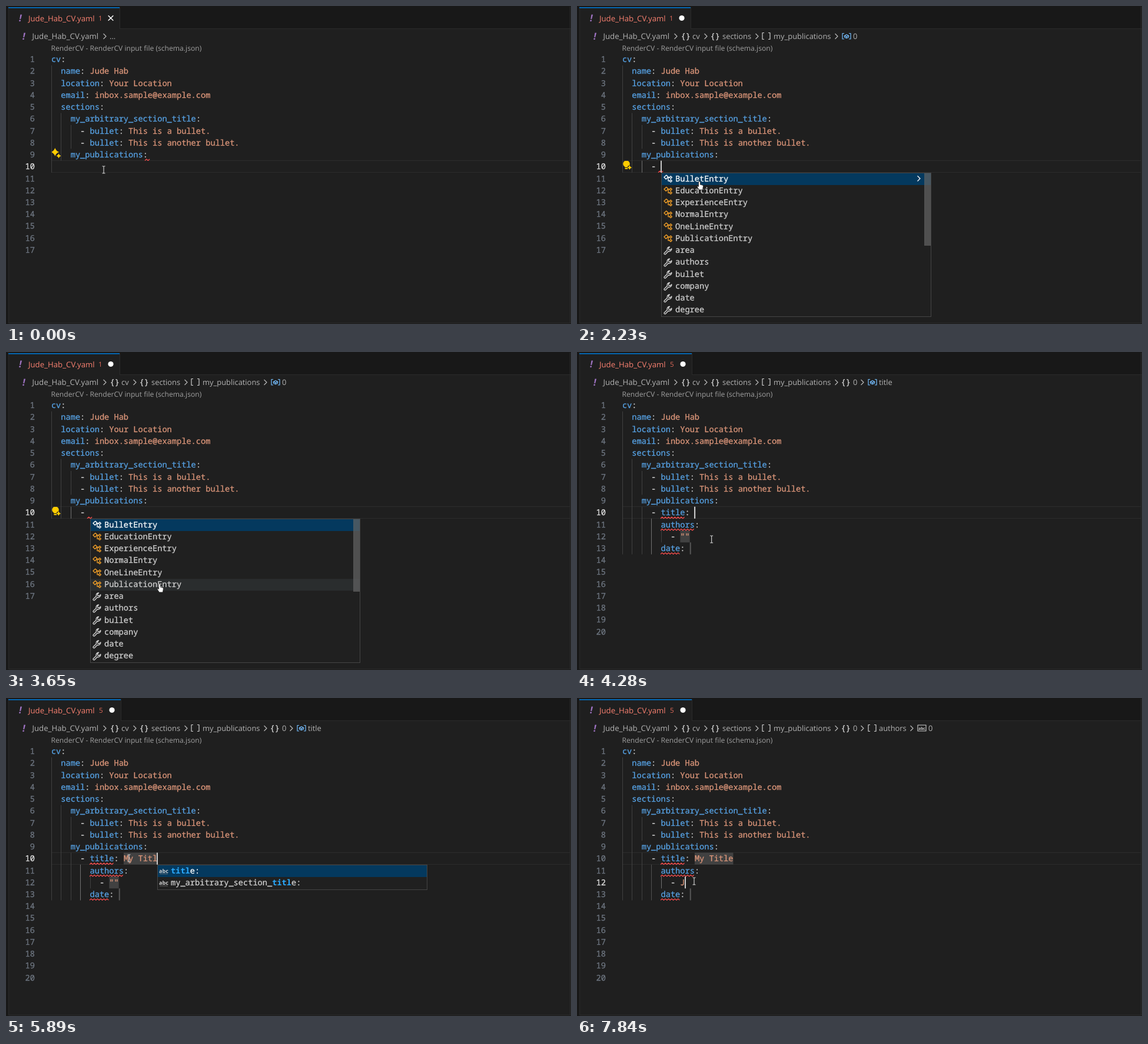
These frames come from a looping animation (960x540 px, 8000 ms). An HTML page with a canvas:

```html
<!DOCTYPE html>
<html lang="en">
<head>
<meta charset="utf-8">
<title>Editing a CV in YAML</title>
<style>
html, body { margin: 0; height: 100%; overflow: hidden; background: #1f1f1f; }
canvas { display: block; width: 100vw; height: 100vh; }
</style>
</head>
<body>
<canvas id="stage" width="960" height="540"></canvas>
<script>
const ctx = document.getElementById('stage').getContext('2d');
const LOOP = 8000, CHAR = 8.2, LINE = 20.23;
const MONO = '13.67px "Noto Sans Mono", monospace';
const sans = size => `${size}px "Open Sans", sans-serif`;
const KEY = '#57a3e6', STRING = '#dc967a', PLAIN = '#d0d0d0', RED = '#f14c4c';
const CRUMB = '#b2b2b2', YELLOW = '#ffcc00', BLUE = '#75beff';
const PERSON = 'Jude Hab', FILE = PERSON.replace(' ', '_') + '_CV.yaml';

// Moments of the story, in ms
const DASH = 730, SPACE = 1120, SUGGEST = 1400, CRUMBS = 1480, BULB = 1560;
const INSERT = 3950, ERRORS = 4200, CLICK = 6860, ERASE = 7270, EMPTY = 7380, LETTER = 7560;
const TITLE = 'My Title', TITLE_KEYS = [5100, 5320, 5440, 5560, 5670, 5780, 5870, 5990];
const CURSOR_RESETS = [70, DASH, SPACE, INSERT, ...TITLE_KEYS, CLICK, ERASE, EMPTY, LETTER];
const MOUSE = [[2050, 166, 278], [2230, 208, 298], [2850, 246, 369], [3210, 261, 394],
  [3920, 261, 394], [4500, 209, 272], [6300, 209, 272], [6860, 199, 311]];
const ENTRIES = ['Bullet', 'Education', 'Experience', 'Normal', 'OneLine', 'Publication'].map(s => s + 'Entry');
const FIELDS = ['area', 'authors', 'bullet', 'company', 'date', 'degree'];

const CLASS_ICON = 'M1 4.5 4.8 1 8 4 4.2 7.8Z M6.5 5H10 M8 5V10.8H10 M10 4.8 12.2 2.8 14.3 4.8 12.2 6.8Z M10 10.8 12.2 8.8 14.3 10.8 12.2 12.8Z';
const WRENCH_ICON = 'M10.5 1.2A4.2 4.2 0 0 0 6.4 6.8L1.3 11.6a1.5 1.5 0 0 0 2.1 2.1L8.3 8.7A4.2 4.2 0 0 0 13.8 4.2L11.3 6.4 8.9 5.9 8.4 3.6Z';
const HAND = 'M-1.4 .6Q0-1.4 1.4 .6V5.2L5 6Q6.6 6.5 6.4 8L5.4 14H-.6L-4 8.8Q-3.4 7-1.4 8.6Z';
const IBEAM = 'M-2.5-6H-1Q0-6 0-5 0-6 1-6H2.5 M0-5V5 M-2.5 6H-1Q0 6 0 5 0 6 1 6H2.5';

const colX = col => 76.9 + CHAR * col;
const baseline = row => 95.2 + LINE * (row - 1);
const rowTop = row => 80.6 + LINE * (row - 1);

function rect(x, y, w, h, color) {
  ctx.fillStyle = color;
  ctx.fillRect(x, y, w, h);
}

function text(str, x, y, color, font = MONO, align = 'left') {
  ctx.font = font;
  ctx.textAlign = align;
  ctx.fillStyle = ctx.strokeStyle = color;
  ctx.fillText(str, x, y);
  // A hairline outline gives code its slightly heavier weight
  if (font === MONO) {
    ctx.lineWidth = .3;
    ctx.strokeText(str, x, y);
  }
}

function shape(x, y, d, { stroke, fill, width = 1.1 }) {
  const path = new Path2D(d);
  ctx.save();
  ctx.translate(x, y);
  ctx.lineWidth = width;
  if (fill) { ctx.fillStyle = fill; ctx.fill(path); }
  if (stroke) { ctx.strokeStyle = stroke; ctx.stroke(path); }
  ctx.restore();
}

const dot = (x, y, r, fill) => shape(x, y, `M${-r} 0a${r} ${r} 0 1 0 ${2 * r} 0a${r} ${r} 0 1 0 ${-2 * r} 0`, { fill });
const chevron = (x, y, stroke) => shape(x, y, 'M-2.5-4.5 2 0-2.5 4.5', { stroke, width: 1.3 });
const star = (x, y, r) => shape(x, y, `M0 ${-r}Q${r * .25} ${-r * .25} ${r} 0 ${r * .25} ${r * .25} 0 ${r} ${-r * .25} ${r * .25} ${-r} 0 ${-r * .25} ${-r * .25} 0 ${-r}Z`, { fill: YELLOW });

function squiggle(x, row, width) {
  let d = 'M0 1.2';
  for (let i = 1; i * 2.7 <= width + 1; i++) d += `L${i * 2.7} ${i % 2 ? -1.2 : 1.2}`;
  shape(x, rowTop(row) + 18.8, d, { stroke: RED, width: 1.3 });
}

function code(row, col, marker, key, value = '') {
  text(marker, colX(col), baseline(row), PLAIN);
  col += marker.length;
  if (key) {
    text(key, colX(col), baseline(row), KEY);
    text(':', colX(col + key.length), baseline(row), PLAIN);
    col += key.length + 2;
  }
  text(value, colX(col), baseline(row), STRING);
}

function guide(col, first, last, color = '#404040') {
  rect(Math.round(colX(col)), rowTop(first), 1, LINE * (last - first + 1), color);
}

function drawFrame(errors, modified) {
  rect(0, 0, 960, 38, '#181818');
  rect(0, 38, 960, 502, '#1f1f1f');
  rect(0, 0, 4, 540, '#181818');
  rect(4, 38, 956, 1, '#2b2b2b');
  rect(4, 1, 1, 538, '#2b2b2b');
  rect(958, 1, 1, 538, '#2b2b2b');
  rect(0, 538, 960, 2, '#181818');
  rect(4, 538, 956, 1, '#2b2b2b');
  const shift = errors > 1 ? 2 : 0;
  rect(5, 2, 188 + shift, 37, '#1f1f1f');
  rect(4, 2, 189 + shift, 1.6, '#0078d4');
  rect(193 + shift, 2, 1, 36, '#2b2b2b');
  text('!', 22, 26, '#a074c4', 'italic bold 16px "Open Sans", sans-serif');
  text(FILE, 38, 25.5, '#f88070', sans(13.2));
  text(errors, 157 + shift / 2, 25.3, '#e06a5a', sans(11.6));
  if (modified) dot(178 + shift, 20.5, 4.6, '#ffffff');
  else shape(178, 20.5, 'M-4.3-4.3 4.3 4.3M4.3-4.3-4.3 4.3', { stroke: '#ffffff', width: 1.5 });
}

const crumbIcons = {
  object: x => text('{}', x - 1.5, 55.8, PLAIN),
  array: x => shape(x, 51.5, 'M4-6H1V5H4M11-6H14V5H11', { stroke: PLAIN, width: 1.2 }),
  value: x => shape(x, 51.5, 'M4-5H1V4.5H4M12-5H15V4.5H12M4.5-1 8-3 11.5-1.2V1.5L8 3.2 4.5 1.5ZM4.5-1 8 .6 11.5-1.2M8 .6V3.2', { stroke: BLUE, width: 1.2 }),
  string: x => {
    shape(x, 51.5, 'M1-5.5H15V4.5H1Z', { stroke: PLAIN });
    text('abc', x + 8, 53.6, PLAIN, 'bold ' + sans(6.5), 'center');
  }
};

function crumb(chevronX, icon, iconX, label, labelX) {
  chevron(chevronX, 51.5, CRUMB);
  crumbIcons[icon](iconX);
  text(label, labelX, 56.4, CRUMB, sans(12.9));
}

function drawBreadcrumbs(t) {
  text('!', 28, 57, '#a074c4', 'italic bold 16px "Open Sans", sans-serif');
  text(FILE, 44.5, 56.4, CRUMB, sans(13.2));
  if (t < CRUMBS) {
    chevron(168, 51.5, CRUMB);
    text('...', 176, 56.4, CRUMB, sans(12.9));
    return;
  }
  crumb(168, 'object', 178, 'cv', 196);
  crumb(219, 'object', 228, 'sections', 247);
  crumb(306, 'array', 314, 'my_publications', 334);
  if (t < INSERT) return crumb(441, 'value', 450, '0', 469);
  crumb(441, 'object', 450, '0', 469);
  if (t < CLICK) return crumb(485, 'value', 494, 'title', 513);
  crumb(485, 'array', 494, 'authors', 513);
  crumb(569, 'string', 578, '0', 597);
}

function drawGutter(t, activeRow) {
  const count = t < INSERT ? 17 : 20;
  for (let row = 1; row <= count; row++)
    text(row, 49, baseline(row), row === activeRow ? '#e0e0e0' : '#6e7681', MONO, 'right');
  if (t < 850) {
    star(83.3, 248, 7);
    star(89.5, 254.5, 4);
  } else if (t >= BULB && t < INSERT) {
    dot(84, 268, 5.8, YELLOW);
    rect(81.5, 272, 5, 5, YELLOW);
    rect(81.5, 274, 5, 1, '#1f1f1f');
    dot(89.3, 274.3, 3.6, '#1f1f1f');
    star(89.3, 274.3, 3.8);
  }
}

function drawCode(t, typed, author) {
  rect(77, 262, 882, 1, '#2c2c2c');
  rect(77, 282, 882, 1, '#2c2c2c');
  const lastRow = t < INSERT ? 10 : 13;
  guide(0, 2, lastRow);
  guide(2, 6, t < DASH ? 9 : lastRow);
  guide(4, 7, 8);
  if (t >= DASH) guide(4, 10, lastRow, t < INSERT ? '#707070' : '#404040');

  text('RenderCV - RenderCV input file (schema.json)', 76.5, 76.4, '#9f9f9f', sans(12.14));
  code(1, 0, '', 'cv');
  code(2, 2, '', 'name', PERSON);
  code(3, 2, '', 'location', 'Your Location');
  code(4, 2, '', 'email', 'inbox.sample@example.com');
  code(5, 2, '', 'sections');
  code(6, 4, '', 'my_arbitrary_section_title');
  code(7, 6, '- ', 'bullet', 'This is a bullet.');
  code(8, 6, '- ', 'bullet', 'This is another bullet.');
  code(9, 4, '', 'my_publications');
  if (t < SPACE) squiggle(236, 9, 8);
  if (t < INSERT) {
    if (t >= DASH) code(10, 6, '-');
    if (t >= CRUMBS) squiggle(138, 10, 8);
    return;
  }

  const clicked = t >= CLICK;
  guide(6, 11, 13, clicked ? '#505050' : '#707070');
  guide(8, 12, 12, clicked ? '#707070' : '#404040');
  const placeholder = '#414141';
  rect(colX(15), rowTop(10), Math.max(2, typed.length * CHAR), LINE, placeholder);
  if (t < ERASE) rect(colX(12), rowTop(12), 2 * CHAR, LINE, placeholder);
  rect(colX(14), rowTop(13), 2, LINE, '#575757');
  code(10, 6, '- ', 'title', typed);
  code(11, 8, '', 'authors');
  code(12, 10, '- ', '', author);
  code(13, 8, '', 'date');
  if (t >= ERRORS) {
    squiggle(142, 10, 41);
    squiggle(142, 11, 57);
    squiggle(142, 13, 33);
  }
}

function popup(x, rows) {
  const height = Math.round(rows * 20.25) + 2;
  rect(x, 283, 459, height, '#454545');
  rect(x + 1, 284, 457, height - 2, '#202020');
  rect(x + 1, 284, 457, 20, '#04395e');
}

function drawEntryPopup(mouse) {
  const hovered = Math.floor((mouse.y - 283) / 20.25);
  popup(143, 12);
  if (hovered > 0) rect(144, 284 + hovered * 20.25, 457, 20, '#2a2d2e');
  if (hovered === 0) chevron(581, 293, '#ffffff');
  [...ENTRIES, ...FIELDS].forEach((label, i) => {
    const y = 293.3 + i * 20.25, isEntry = i < ENTRIES.length;
    const stroke = i === 0 ? '#ffffff' : isEntry ? '#ee9d28' : PLAIN;
    shape(147, y - 7, isEntry ? CLASS_ICON : WRENCH_ICON, { stroke, width: 1.4 });
    text(label, 167, y + 4.4, i ? PLAIN : '#ffffff');
  });
  rect(590, 284, 11, 123, 'rgba(100, 100, 100, .7)');
}

function drawWordPopup(x, match) {
  const words = ['title:', 'my_arbitrary_section_title:', 'my_publications:'].filter(w => w.includes(match));
  popup(x, words.length);
  words.forEach((word, i) => {
    const y = 297.7 + i * 20.25, start = word.indexOf(match), end = start + match.length;
    const hit = c => c >= start && c < end;
    text('abc', x + 3, y - 1, PLAIN, 'bold ' + sans(9));
    rect(x + 4, y + .7, 14, .7, '#8a8a8a');
    [...word].forEach((char, c) =>
      text(char, x + 23 + c * CHAR, y, hit(c) ? '#2aaaff' : i ? PLAIN : '#ffffff', (hit(c) ? 'bold ' : '') + MONO));
  });
}

function mouseAt(t) {
  const next = MOUSE.findIndex(stop => stop[0] > t);
  const [, x, y] = MOUSE[next < 0 ? MOUSE.length - 1 : next];
  if (next <= 0) return { x, y };
  const [t0, x0, y0] = MOUSE[next - 1];
  const k = (t - t0) / (MOUSE[next][0] - t0);
  return { x: x0 + (x - x0) * k, y: y0 + (y - y0) * k };
}

function drawCursor(t, typed, author) {
  const reset = CURSOR_RESETS.filter(time => time <= t).pop();
  if (reset === undefined || (t - reset) % 1000 >= 450) return;
  const row = t < CLICK ? 10 : 12;
  const col = t < DASH ? 6 : t < SPACE ? 7 : t < INSERT ? 8 : row === 10 ? 15 + typed.length : 12 + author.length;
  rect(Math.round(colX(col)) - 1, rowTop(row), 2, LINE, '#c8c8c8');
}

function draw(now) {
  const t = now % LOOP;
  const typed = TITLE.slice(0, TITLE_KEYS.filter(time => time <= t).length);
  const author = t < ERASE ? '""' : t < EMPTY ? '"' : t < LETTER ? '' : 'J';
  const mouse = mouseAt(t);
  const choosing = t >= SUGGEST && t < INSERT;

  drawFrame(t < ERRORS ? 1 : 5, t >= DASH);
  drawBreadcrumbs(t);
  drawGutter(t, t < CLICK ? 10 : 12);
  drawCode(t, typed, author);
  drawCursor(t, typed, author);
  if (choosing) drawEntryPopup(mouse);
  if (typed.length > 4 && t < CLICK)
    drawWordPopup(Math.round(colX(15 + typed.length)), typed.slice(3).toLowerCase());
  if (choosing && mouse.y > 283) shape(mouse.x, mouse.y, HAND, { fill: '#ffffff', stroke: '#222222', width: .8 });
  else shape(mouse.x, mouse.y, IBEAM, { stroke: '#d8d8d8', width: 1.1 });
}

ctx.textRendering = 'geometricPrecision';
ctx.lineJoin = 'round';
(function tick() {
  draw(performance.now());
  requestAnimationFrame(tick);
})();
</script>
</body>
</html>
```
